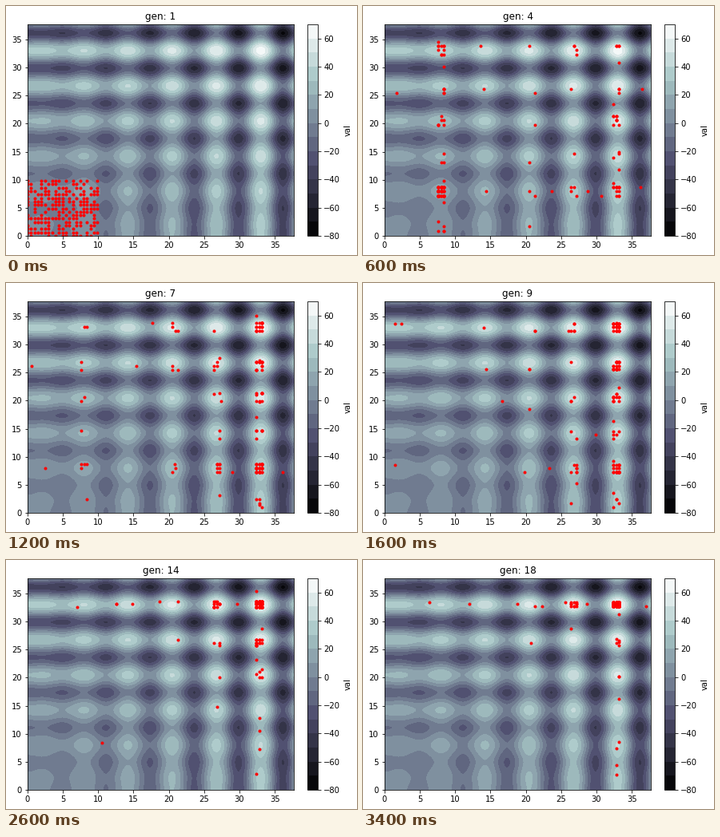
These frames come from a looping animation (439 by 312 pixels, 3600 ms). A matplotlib script:

```python
import numpy as np
import matplotlib.pyplot as plt
from matplotlib.animation import FuncAnimation

W, H, DPI = 439, 312, 72
GENERATIONS, INTERVAL = 18, 200
LIMIT = 12 * np.pi
POPULATION, FOUNDERS, MUTANTS = 140, 200, 17

# Where the fitness has its crests along each axis
X_PEAKS = np.array([1.9, 8.0, 14.0, 20.9, 26.8, 32.8])
Y_PEAKS = np.array([1.7, 7.9, 13.9, 20.6, 26.2, 33.1])


def fitness(x, y):
    return x * np.sin(x) + y * np.sin(y)


def founders():
    """Distinct random nodes of a lattice in the lower left corner."""
    cols, rows = 21, 17
    rng = np.random.default_rng(4)
    nodes = rng.choice(cols * rows, FOUNDERS, replace=False)
    return np.column_stack([nodes % cols * 9.9 / (cols - 1),
                            nodes // cols * 9.8 / (rows - 1)])


START = founders()
BY_FITNESS = START[np.argsort(-fitness(*START.T))]


def inherit(rng, peaks, home, pull, step):
    """Coordinates on crests; `home` is the share left on the first big
    crest, `pull` is how strongly the higher crests win."""
    weights = np.exp(pull * np.arange(len(peaks)))
    weights *= (1 - home) / weights.sum()
    weights[1] += home
    crest = rng.choice(peaks, POPULATION, p=weights)
    return crest + step * rng.integers(-1, 2, POPULATION)


def population(gen):
    if gen == 1:
        return START
    rng = np.random.default_rng(gen)
    t = max(gen - 4, 0) / (GENERATIONS - 4)
    x = inherit(rng, X_PEAKS, np.interp(gen, [2, 4, 6, 8], [0.85, 0.6, 0.2, 0]),
                1 + 1.6 * t, 0.42)
    y = inherit(rng, Y_PEAKS, np.interp(gen, [2, 4, 9, 13], [0.8, 0.45, 0.15, 0]),
                0.1 + 2.6 * t ** 2, 0.8 - 0.4 * t)

    # A mutation redraws one coordinate and keeps the other
    half = MUTANTS // 2
    x[:half] = rng.uniform(0, LIMIT, half)
    y[half:MUTANTS] = rng.uniform(0, LIMIT, MUTANTS - half)

    survivors = BY_FITNESS[:max(0, 40 * (4 - gen))]
    return np.vstack([survivors, np.column_stack([x, y])])


def place(left, top, right, bottom):
    """Axes rectangle from pixel edges."""
    return [left / W, 1 - bottom / H, (right - left) / W, (bottom - top) / H]


fig = plt.figure(figsize=(W / DPI, H / DPI), dpi=DPI, facecolor="white")
ax = fig.add_axes(place(27, 23, 360, 288))
cax = fig.add_axes(place(377, 23, 390.25, 288))

axis = np.linspace(0, LIMIT, 378)
gx, gy = np.meshgrid(axis, axis)
field = ax.contourf(gx, gy, fitness(gx, gy), levels=np.arange(-80, 71, 10),
                    cmap="bone")
fig.colorbar(field, cax=cax, ticks=range(-80, 61, 20), label="val")

ax.set(xlim=(0, LIMIT), ylim=(0, LIMIT),
       xticks=range(0, 36, 5), yticks=range(0, 36, 5))
dots, = ax.plot([], [], "r.", markersize=6)
title = ax.set_title("gen: 1")


def update(frame):
    gen = frame + 1
    dots.set_data(*population(gen).T)
    title.set_text(f"gen: {gen}")
    return dots, title


anim = FuncAnimation(fig, update, frames=GENERATIONS, interval=INTERVAL,
                     repeat=True, repeat_delay=0)
plt.show()
```
